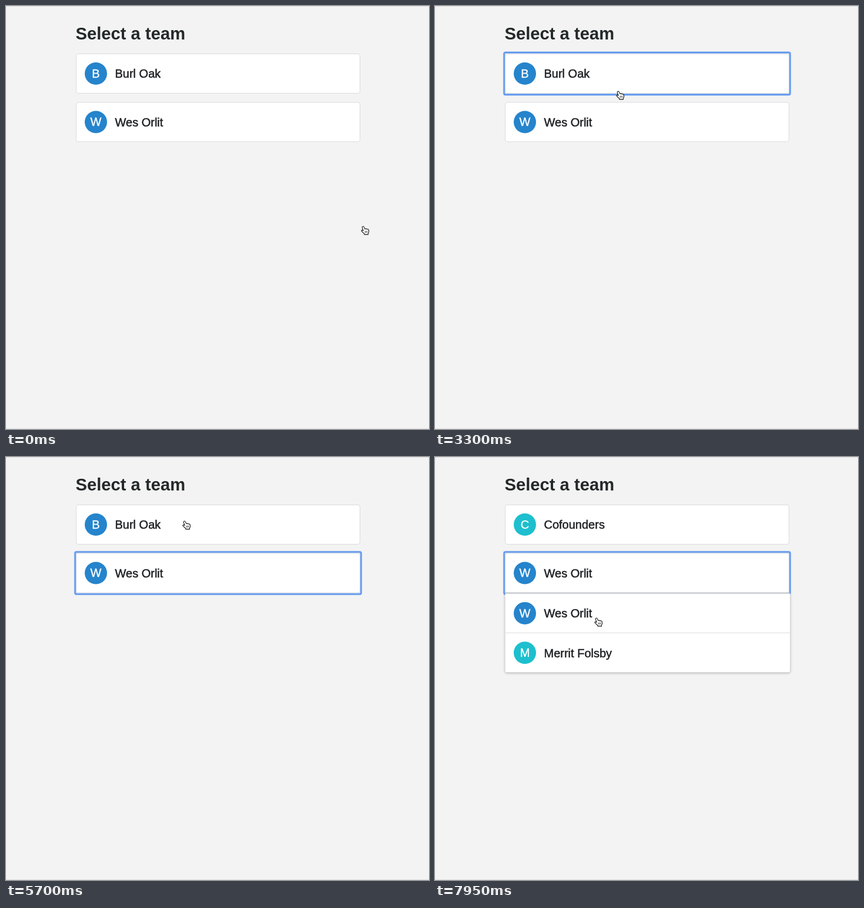
Animation of 720x720 px, one loop 8000 ms. Source, as an HTML page:

```html
<!DOCTYPE html>
<html lang="en">
<head>
<meta charset="utf-8">
<title>Select a team</title>
<style>
  html, body { margin: 0; width: 100%; height: 100%; overflow: hidden; background: #f3f3f3; }
  svg { display: block; width: 100vw; height: 100vh; }
  text { font-family: "Liberation Sans", Arial, sans-serif; font-size: 20px; }
  .title { font-size: 29.2px; font-weight: 700; fill: #232829; }
  .name { fill: #1f2023; stroke: #1f2023; stroke-width: .5px; }
  .letter { fill: #fff; stroke: #fff; stroke-width: .35px; text-anchor: middle; }
  .list { filter: drop-shadow(0 1px 2px rgba(0, 0, 0, .32)); }
</style>
</head>
<body>
<svg id="stage" viewBox="0 0 720 720"></svg>
<script>
const LOOP = 8000, STEP = 50;
const ROW = 67.3, CARD_H = 68;
const CARD_Y = [81, 163.5];
const COLORS = ['#2584cc', '#1dbfce', '#ffad18', '#17d064', '#ff4a5a', '#7d64fb', '#c04a35', '#2f9bf5'];
const TEAMS = ['Burl Oak', 'Cofounders', 'Product', 'Growth'];
const PEOPLE = ['Wes Orlit', 'Merrit Folsby', 'Soren Palva', 'Kip Varrendo', 'Arlo Bensi',
  'Jocelyn Du Farvil', 'Lotte Brunk', 'Nils Ambery'];

// time, chosen team, focused card (-1: none), open list
const STATES = [
  [0, 0, -1, ''],
  [1150, 0, 0, 'teams'],
  [2850, 0, 0, ''],
  [3650, 0, 1, 'people'],
  [5350, 0, 1, ''],
  [5950, 0, 0, 'teams'],
  [6800, 1, -1, ''],
  [7600, 1, 1, 'pair']
];

// pointer: time, x, y
const PATH = [
  [0, 611, 382], [50, 611, 382], [600, 345, 125], [750, 345, 125],
  [1150, 338, 118], [1650, 333, 112], [1900, 333, 112], [2450, 317, 320],
  [2750, 320, 120], [3100, 318, 118], [3300, 315, 152], [3500, 298, 198],
  [3600, 298, 198], [4200, 294, 203], [4800, 300, 660], [5250, 300, 205],
  [5350, 300, 203], [5700, 307, 116], [5950, 307, 116], [6600, 260, 259],
  [6900, 260, 259], [7450, 274, 205], [7650, 274, 205], [7950, 278, 281]
];

const stage = document.getElementById('stage');

function add(parent, tag, attrs = {}, text = '') {
  const el = document.createElementNS('http://www.w3.org/2000/svg', tag);
  for (const key in attrs) el.setAttribute(key, attrs[key]);
  if (text) el.textContent = text;
  return parent.appendChild(el);
}

function box(parent, x, y, width, height, rx, attrs) {
  return add(parent, 'rect', { x, y, width, height, rx, ...attrs });
}

function entry(parent, name, index, cy) {
  const g = add(parent, 'g');
  add(g, 'circle', { cx: 153, cy, r: 19, fill: COLORS[index] });
  add(g, 'text', { class: 'letter', x: 153, y: cy + 6.8 }, name[0]);
  add(g, 'text', { class: 'name', x: 185.5, y: cy + 7.3 }, name);
  return g;
}

function card(y) {
  box(stage, 119.5, y + .5, 483, CARD_H - 1, 3.5, { fill: '#fff', stroke: '#dcdcdc' });
}

function ring(y) {
  const g = add(stage, 'g', { fill: 'none' });
  box(g, 116.3, y - 3.2, 489.4, CARD_H + 6.4, 3, { stroke: '#a9c7f6', 'stroke-width': 1 });
  box(g, 119, y - .5, 484, CARD_H + 1, 2, { stroke: '#b4cdf6', 'stroke-width': 1.2 });
  box(g, 117.6, y - 1.9, 486.8, CARD_H + 3.8, 2.5, { stroke: '#5b94ec', 'stroke-width': 2.2 });
  return g;
}

function list(names, top) {
  const g = add(stage, 'g');
  const h = names.length * ROW;
  add(g, 'path', {
    class: 'list', fill: '#fff',
    d: `M119.5 ${top}H604.3v${h - 3}q0 3-3 3H122.5q-3 0-3-3z`
  });
  box(g, 119.5, top - .7, 484.8, 1.2, 0, { fill: '#bcbcbe' });
  names.forEach((name, i) => {
    if (i) box(g, 119.5, top + i * ROW - .5, 484.8, 1, 0, { fill: '#dcdcdc' });
    entry(g, name, i, top + i * ROW + 33.9);
  });
  return g;
}

function hand() {
  const g = add(stage, 'g', { stroke: '#111', 'stroke-linejoin': 'round', 'stroke-linecap': 'round' });
  add(g, 'path', {
    fill: '#fff', 'stroke-width': 1.1,
    d: 'M3.2 1.4c1-.7 2-.2 2.4.7L7 5.4c.8-.6 1.8-.4 2.2.3.8-.5 1.7-.3 2.1.4.9-.4 1.9 0 2.2 1l.4 2.6' +
       'c0 1.6-.6 2.6-1.2 3.6v1.6H6.2v-1.4C5 12.8 3.4 11.4 1.5 9.2.9 8.2 1.7 7.2 2.8 7.6l1.6.9L2.6 3.1c-.2-.7 0-1.3.6-1.7z'
  });
  add(g, 'path', { fill: 'none', 'stroke-width': .7, d: 'M7.4 9.2l.2 2.6M9.2 9.1l.1 2.6M11 9l.1 2.6' });
  return g;
}

box(stage, 0, 0, 720, 720, 0, { fill: '#f3f3f3' });
box(stage, 0, 0, 720, 1, 0, { fill: '#dedede' });
box(stage, 0, 719, 720, 1, 0, { fill: '#dedede' });
add(stage, 'text', { class: 'title', x: 118.5, y: 56.7 }, 'Select a team');

CARD_Y.forEach(card);
const rings = CARD_Y.map(ring);
const chosen = [0, 1].map(i => entry(stage, TEAMS[i], i, 115));
entry(stage, PEOPLE[0], 0, 197.5);
const lists = {
  teams: list(TEAMS, 149.4),
  people: list(PEOPLE, 232),
  pair: list(PEOPLE.slice(0, 2), 232)
};
const pointer = hand();

const show = (el, on) => el.setAttribute('visibility', on ? 'visible' : 'hidden');

function pointerAt(t) {
  const i = PATH.findIndex(p => p[0] > t);
  if (i < 0) return PATH[PATH.length - 1].slice(1);
  const [t0, x0, y0] = PATH[i - 1], [t1, x1, y1] = PATH[i];
  const u = (t - t0) / (t1 - t0), s = u * u * (3 - 2 * u);
  return [x0 + (x1 - x0) * s, y0 + (y1 - y0) * s];
}

function draw(t) {
  const [, team, focus, open] = STATES.filter(s => s[0] <= t).pop();
  chosen.forEach((el, i) => show(el, i === team));
  rings.forEach((el, i) => show(el, i === focus));
  for (const key in lists) show(lists[key], key === open);
  const [x, y] = pointerAt(t);
  pointer.setAttribute('transform', `translate(${x - 7.3} ${y - 8})`);
}

const start = performance.now();
function tick() {
  const t = (performance.now() - start) % LOOP;
  draw(Math.floor(t / STEP) * STEP);
  requestAnimationFrame(tick);
}
draw(0);
requestAnimationFrame(tick);
</script>
</body>
</html>
```
